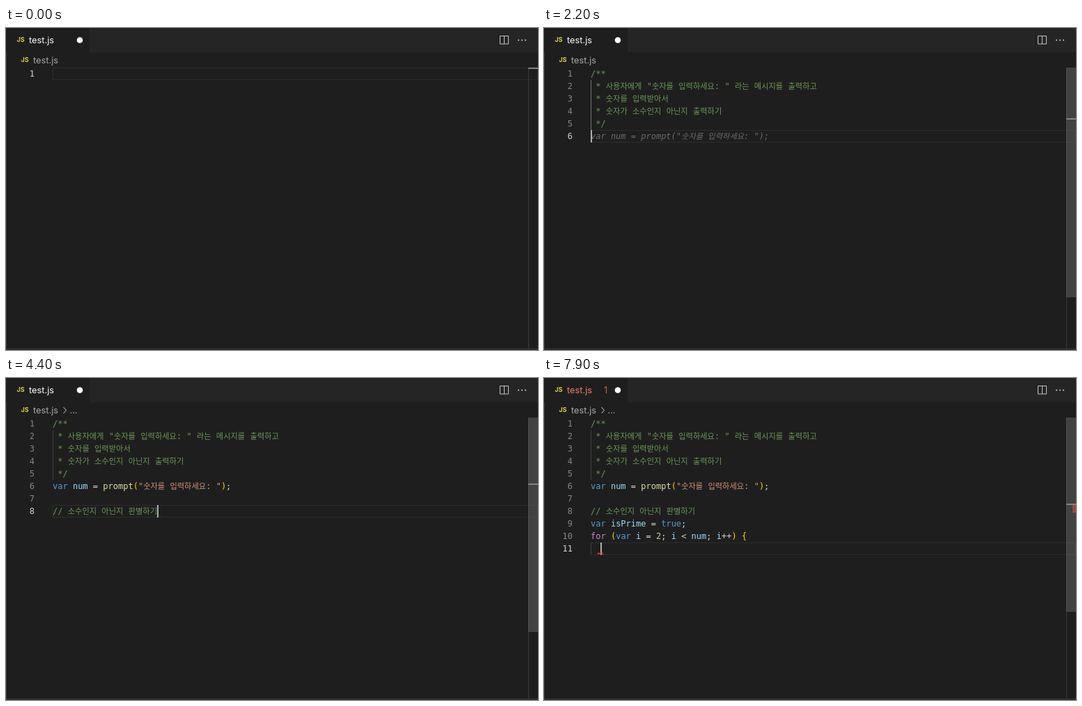
Animation of 764 by 464 pixels, one loop 8000 ms. Source, as an HTML page:

```html
<!DOCTYPE html>
<html lang="ko">
<head>
<meta charset="utf-8">
<title>test.js</title>
<style>
html, body { margin: 0; width: 764px; height: 464px; overflow: hidden; background: #1e1e1e; }
body { position: relative; font: 12px/18px "DejaVu Sans Mono", "Liberation Mono", monospace; color: #d4d4d4; }
body * { position: absolute; }
span, b { position: static !important; font-weight: inherit; }
.bar { left: 0; top: 0; width: 764px; height: 35px; background: #252526; }
.tab { left: 0; top: 0; width: 120px; height: 35px; background: #1e1e1e; }
.ui { font: 12.8px/18px Inter, "Open Sans", sans-serif; white-space: pre; }
.js { font: bold 9px/18px Inter, "Open Sans", sans-serif; color: #d5d04a; }
svg { left: 0; top: 0; }
.row { left: 67px; height: 18px; white-space: pre; }
.num { left: 0; width: 41px; text-align: right; color: #858585; }
.num.now { color: #d0d0d0; }
.h { font-family: "Noto Sans CJK KR", "Noto Sans CJK JP", "Noto Sans CJK", sans-serif; font-size: 11.25px; line-height: 0; }
.com { color: #6a9955; }
.str { color: #ce9178; }
.key { color: #569cd6; }
.ctl { color: #c586c0; }
.dig { color: #b5cea8; }
.fn { color: #dcdcaa; }
.par { color: #ffd700; }
.id { color: #9cdcfe; }
.ghost { color: #6b6b6b; font-style: italic; }
.caret { top: 0; width: 2px; height: 18px; background: #aeafad; }
#now { left: 67px; width: 697px; height: 18px; box-sizing: border-box; border: 1px solid #2c2c2c; }
.guide { left: 67px; width: 1px; }
#ruler { left: 750px; top: 57px; width: 1px; height: 405px; background: #3a3a3a; }
#slider { left: 750px; top: 57px; width: 14px; background: rgba(121, 121, 121, .4); }
#mark { left: 750px; width: 14px; height: 2px; background: #858585; }
#flaw { left: 759px; top: 183px; width: 5px; height: 11px; background: #a5473a; }
.edge { left: 0; background: #363636; }
</style>
</head>
<body>
<div class="bar"></div>
<div class="tab"></div>
<div class="js" style="left:15.5px;top:8px">JS</div>
<div class="ui" id="title" style="left:33px;top:9px">test.js</div>
<div class="ui" id="count" style="left:86px;top:9px;color:#c4604f">1</div>
<div class="js" style="left:21.5px;top:37px">JS</div>
<div class="ui" style="left:39px;top:37.5px;color:#a9a9a9">test.js</div>
<div class="ui" id="dots" style="left:91.5px;top:37.5px;color:#a9a9a9">...</div>
<div id="now"></div>
<div id="guides"></div>
<div id="code"></div>
<div id="ruler"></div>
<div id="slider"></div>
<div id="flaw"></div>
<div id="mark"></div>
<svg width="764" height="464" fill="none">
  <circle cx="106" cy="17.5" r="4.3" fill="#fff"/>
  <path d="M709.5 11.5h12v11.5h-12zM715.5 11.5v11.5" stroke="#c5c5c5"/>
  <g fill="#c5c5c5"><circle cx="736" cy="17.5" r="1.1"/><circle cx="741" cy="17.5" r="1.1"/><circle cx="746" cy="17.5" r="1.1"/></g>
  <path id="chevron" d="M82.5 42l4 4.5-4 4.5" stroke="#a9a9a9" stroke-width="1.1"/>
  <path id="squiggle" d="M77 254l2-2 2 2 2-2 2 2" stroke="#e04a3f" stroke-width="1.2"/>
  <g id="mouse">
    <path d="M288.5 295.5q4 0 4 3v11q0 3-4 3m8-17q-4 0-4 3m0 11q0 3 4 3M290 304h5" stroke="#fff" stroke-width="3"/>
    <path d="M288.5 295.5q4 0 4 3v11q0 3-4 3m8-17q-4 0-4 3m0 11q0 3 4 3M290.5 304h4" stroke="#111"/>
  </g>
</svg>
<div class="edge" style="top:35px;width:1px;height:429px"></div>
<div class="edge" style="top:462px;width:764px;height:1px;background:#414141"></div>
<script>
const LOOP = 8000, TOP = 57, ROW = 18, VIEW = 405;
const $ = id => document.getElementById(id);

const code = [
  '/**',
  ' * 사용자에게 "숫자를 입력하세요: " 라는 메시지를 출력하고',
  ' * 숫자를 입력받아서',
  ' * 숫자가 소수인지 아닌지 출력하기',
  ' */',
  'var num = prompt("숫자를 입력하세요: ");',
  '',
  '// 소수인지 아닌지 판별하기',
  'var isPrime = true;',
  'for (var i = 2; i < num; i++) {'
];

// Each step changes only the named fields; text and ghost belong to the last row.
const steps = [
  [0, { rows: 1, text: '', ghost: '', caret: 0, guide: '', crumb: 0, mouse: 0, error: 0, squiggle: 0 }],
  [200, { caret: 1 }],
  [500, { rows: 5, text: code[4], guide: '#707070' }],
  [800, { mouse: 1 }],
  [1000, { caret: 0 }],
  [1200, { rows: 6, text: '', caret: 1, mouse: 0 }],
  [1300, { ghost: code[5] }],
  [1700, { caret: 0 }],
  [2200, { caret: 1 }],
  [2400, { text: code[5], ghost: '' }],
  [2700, { crumb: 1 }],
  [2900, { rows: 7, text: '', guide: '#404040' }],
  [3400, { caret: 0 }],
  [3500, { rows: 8, caret: 1 }],
  [3600, { ghost: 'console.log(isPrime(num));' }],
  [4100, { text: '//', ghost: '' }],
  [4200, { ghost: code[7].slice(2) }],
  [4400, { text: code[7], ghost: '' }],
  [4900, { caret: 0 }],
  [5100, { rows: 9, text: '', caret: 1 }],
  [5500, { ghost: 'for (var i = 2; i <= num/2; i++) {' }],
  [5600, { ghost: code[8], caret: 0 }],
  [5900, { text: code[8], ghost: '', caret: 1 }],
  [6300, { rows: 10, text: '' }],
  [6800, { ghost: code[9], caret: 0 }],
  [7300, { text: code[9], ghost: '', caret: 1 }],
  [7700, { rows: 11, text: '  ' }],
  [7800, { squiggle: 1 }],
  [7900, { error: 1 }]
];
let state = {};
const states = steps.map(([t, change]) => state = { ...state, ...change, t });

const kinds = ['str', 'key', 'ctl', 'dig', 'fn', 'par', 'id'];
const token = /("[^"]*")|\b(var|true)\b|\b(for)\b|(\d+)|(prompt)|([(){}])|([A-Za-z]\w*)|</g;
const span = (kind, s) => `<span class="${kind}">${s}</span>`;
const hangul = s => s.replace(/[가-힣]+/g, m => span('h', m));
const escape = s => s.replace(/</g, '&lt;');

function paint(line) {
  if (/^\s*[/*]/.test(line)) return hangul(span('com', line));
  return hangul(line.replace(token, (m, ...groups) => {
    const k = groups.slice(0, kinds.length).findIndex(Boolean);
    return k < 0 ? '&lt;' : span(kinds[k], m);
  }));
}

const show = (id, on) => $(id).style.visibility = on ? 'visible' : 'hidden';
const guide = (row, count, color) =>
  `<div class="guide" style="top:${TOP + row * ROW}px;height:${count * ROW}px;background:${color}"></div>`;

function render(s) {
  let html = '';
  for (let i = 0; i < s.rows; i++) {
    const last = i === s.rows - 1, top = `style="top:${TOP + i * ROW}px"`;
    let line = paint(last ? s.text : code[i]);
    if (last && s.caret) line += '<i class="caret"></i>';
    if (last && s.ghost) line += span('ghost', hangul(escape(s.ghost)));
    html += `<div class="num${last ? ' now' : ''}" ${top}>${i + 1}</div><div class="row" ${top}>${line}</div>`;
  }
  $('code').innerHTML = html;
  $('guides').innerHTML = (s.guide ? guide(1, 4, s.guide) : '') + (s.rows > 10 ? guide(10, 1, '#404040') : '');

  const above = (s.rows - 1) * ROW, scale = VIEW / (VIEW + above);
  $('now').style.top = TOP + above + 'px';
  $('slider').style.height = Math.round(VIEW * scale) + 'px';
  $('mark').style.top = TOP + Math.max(0, Math.round(above * scale) - 1) + 'px';
  $('title').style.color = s.error ? '#f0806c' : '#fff';
  show('slider', s.rows > 1);
  show('dots', s.crumb);
  show('chevron', s.crumb);
  show('mouse', s.mouse);
  show('squiggle', s.squiggle);
  show('count', s.error);
  show('flaw', s.error);
}

const start = performance.now();
let shown;
function tick() {
  const t = (performance.now() - start) % LOOP;
  const next = states.findLast(s => s.t <= t) || states[0];
  if (next !== shown) render(shown = next);
  requestAnimationFrame(tick);
}
tick();
</script>
</body>
</html>
```
